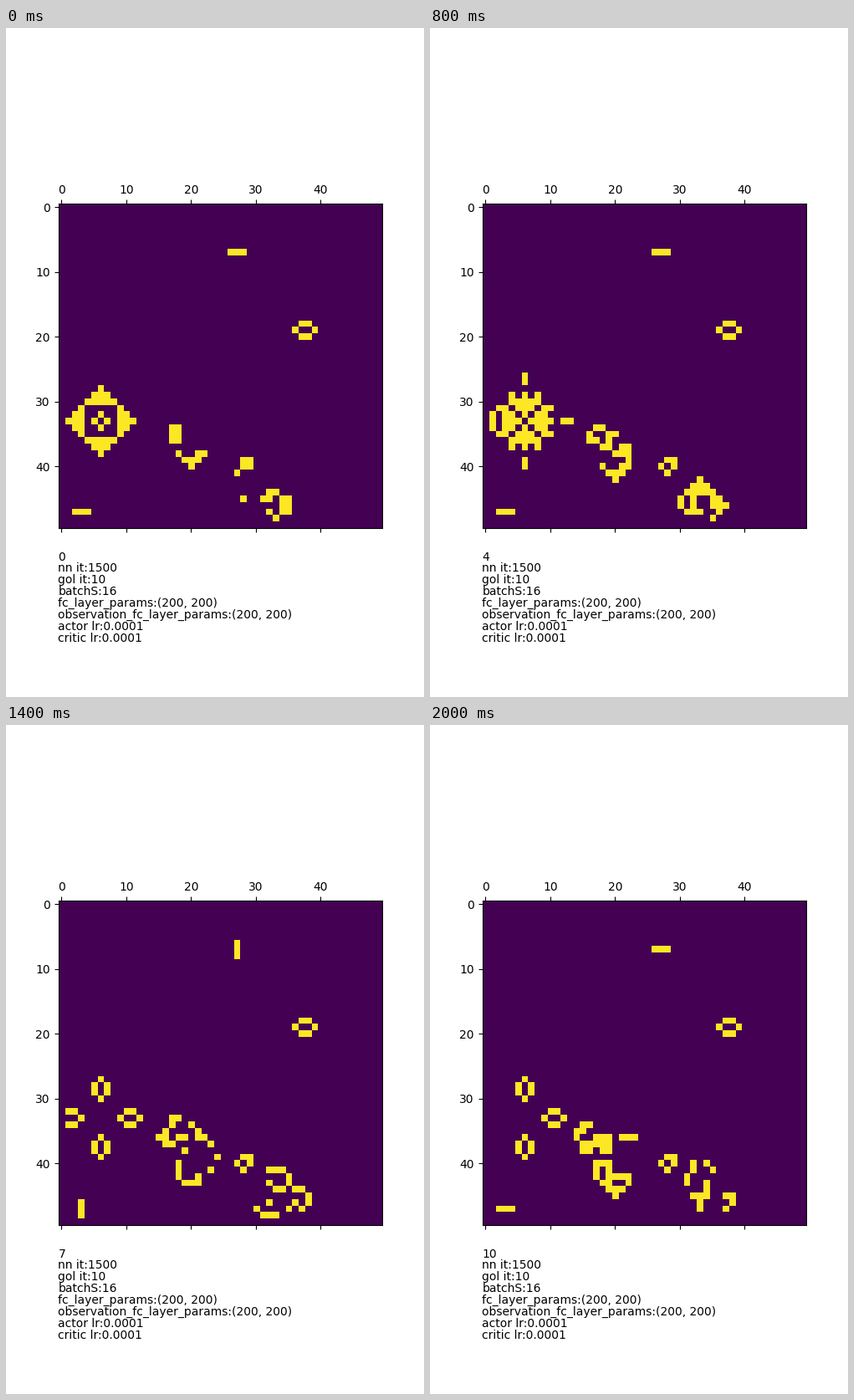
A matplotlib script for the animation above (8 s loop, 500 by 800 pixels).

```python
import matplotlib.pyplot as plt
import numpy as np
from matplotlib.animation import FuncAnimation

W, H, DPI = 500, 800, 100
SIZE = 50
GENERATIONS = 10
INTERVAL, FRAMES = 200, 40

# (row, column, pattern) of each starting shape
SHAPES = [
    (7, 26, "###"),
    (18, 36, ".##. #..# .##."),
    (34, 17, "## ## ##"),
    (38, 18, "#..## .###. ..#.."),
    (39, 27, ".## .## #.."),
    (45, 28, "#"),
    (44, 31, ".##.. ##.## ...## .#.## ..#.."),
    (47, 2, "###"),
]


def first_grid():
    grid = np.zeros((SIZE, SIZE), dtype=int)
    for row, col, pattern in SHAPES:
        for r, line in enumerate(pattern.split()):
            for c, mark in enumerate(line):
                grid[row + r, col + c] = mark == "#"
    # Diamond with a square hole and a small ring at its centre
    y, x = np.abs(np.mgrid[-5:6, -5:6])
    diamond = (x + y <= 5) & (np.maximum(x, y) > 2) | (x + y == 1)
    grid[28:39, 1:12] = diamond
    return grid


def step(grid):
    """One Game of Life step; the outermost cells always stay dead."""
    around = sum(
        np.roll(grid, (dy, dx), (0, 1))
        for dy in (-1, 0, 1) for dx in (-1, 0, 1) if dy or dx
    )
    alive = (around == 3) | ((grid == 1) & (around == 2))
    new = np.zeros_like(grid)
    new[1:-1, 1:-1] = alive[1:-1, 1:-1]
    return new


grids = [first_grid()]
for _ in range(GENERATIONS):
    grids.append(step(grids[-1]))

plt.rcParams["font.family"] = "DejaVu Sans"
fig = plt.figure(figsize=(W / DPI, H / DPI), dpi=DPI)
ax = fig.add_subplot()
image = ax.matshow(grids[0], cmap="viridis", vmin=0, vmax=1)


def caption(baseline, text):
    return fig.text(0.125, 1 - baseline / H, text, fontsize=10)


counter = caption(637, "0")
settings = [
    "nn it:1500",
    "gol it:10",
    "batchS:16",
    "fc_layer_params:(200, 200)",
    "observation_fc_layer_params:(200, 200)",
    "actor lr:0.0001",
    "critic lr:0.0001",
]
for i, line in enumerate(settings):
    caption(650 + 14 * i, line)


def update(frame):
    generation = min(frame, GENERATIONS)
    image.set_data(grids[generation])
    counter.set_text(str(generation))
    return image, counter


anim = FuncAnimation(fig, update, frames=FRAMES, interval=INTERVAL,
                     repeat=True, repeat_delay=0)
plt.show()
```
